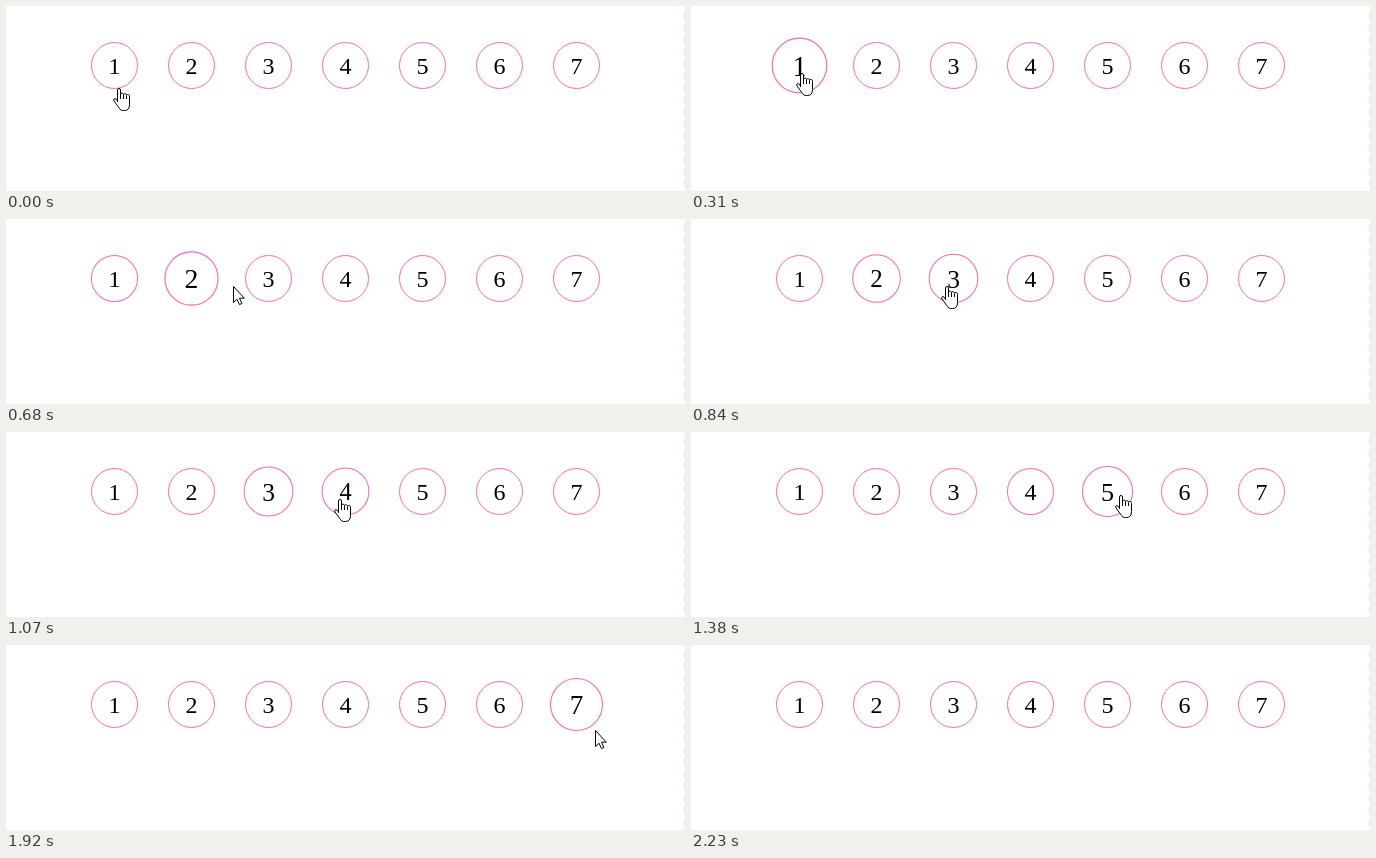
Animation, 679 px wide and 185 px high, one loop 2300 ms. Source, as an HTML page:

```html
<!DOCTYPE html>
<html lang="en">
<head>
<meta charset="utf-8">
<title>Hover circles</title>
<style>
  html, body { margin: 0; width: 100%; height: 100%; overflow: hidden; background: #fff; }
  svg { display: block; }
  .ring { fill: none; stroke: #ff69b4; }
  text { font: 24px "Liberation Serif", "Times New Roman", serif; text-anchor: middle; }
  .cursor { fill: #fff; stroke: #000; stroke-linejoin: round; }
</style>
</head>
<body>
<svg width="679" height="185" viewBox="0 0 679 185">
  <path d="M678.5 6V185" stroke="#ffdcec" stroke-dasharray="7 5"/>
  <g id="circles"></g>
  <g id="cursor" class="cursor">
    <path id="arrow" d="M.5 .5V16.5L4 13.2 6.5 18.6 8.9 17.5 6.5 12.2H11.3z"/>
    <path id="hand" d="M-1.5 14V2a1.5 1.5 0 0 1 3 0V6a1.6 1.6 0 0 1 3 .5a1.6 1.6 0 0 1 3 .8a1.6 1.6 0 0 1 3 1V16.5q0 6-5 6H3.5q-2 0-3-2L-5 13q-1-2.2 .8-2.5q1.3 0 2.7 2.5zM1.5 6V11M4.5 6.5V11M7.5 7.5V11"/>
  </g>
</svg>
<script>
const COUNT = 7, LOOP = 2300, STEPS = 30, STEP = LOOP / STEPS;
const GROW = 450, ZOOM = .2, REACH = 25;
const $ = id => document.getElementById(id);
const show = (id, on) => $(id).style.display = on ? "" : "none";

// Pointer path: step, x, y
const path = [
  [0, 113, 82], [4, 111, 67], [5, 185, 66], [8, 200, 66], [9, 227, 67],
  [12, 270, 67], [14, 334, 67], [18, 430, 63], [22, 545, 60], [25, 589, 85], [28, 608, 184]
];

const centerX = i => 108.5 + 77 * i, centerY = 59.5;
const inside = (i, [x, y]) => Math.hypot(x - centerX(i), y - centerY) < REACH;

function pointerAt(step) {
  const k = path.findIndex(p => p[0] > step);
  if (k < 0) return null;
  const [s0, x0, y0] = path[k - 1], [s1, x1, y1] = path[k];
  const f = (step - s0) / (s1 - s0);
  return [x0 + (x1 - x0) * f, y0 + (y1 - y0) * f];
}

// First and last moment, in ms, at which the pointer is over circle i
function hoverSpan(i) {
  const times = [];
  for (let t = 0; t < LOOP; t += 2) {
    const pos = pointerAt(t / STEP);
    if (pos && inside(i, pos)) times.push(t);
  }
  return [times[0], times.at(-1)];
}

// The CSS "ease" curve
function ease(x) {
  if (x <= 0) return 0;
  if (x >= 1) return 1;
  const bez = (a, b, u) => 3 * a * u * (1 - u) ** 2 + 3 * b * u * u * (1 - u) + u ** 3;
  let lo = 0, hi = 1;
  for (let n = 0; n < 20; n++) {
    const mid = (lo + hi) / 2;
    if (bez(.25, .25, mid) < x) lo = mid; else hi = mid;
  }
  return bez(.1, 1, lo);
}

// Leaving early shortens the way back, as in a reversed CSS transition
function scaleAt(t, [start, end]) {
  if (t < end) return 1 + ZOOM * ease((t - start) / GROW);
  const peak = ease((end - start) / GROW);
  return 1 + ZOOM * peak * (1 - ease((t - end) / (GROW * peak)));
}

const spans = Array.from({ length: COUNT }, (_, i) => hoverSpan(i));
$("circles").innerHTML = spans.map((_, i) =>
  `<g><circle class="ring" r="23"/><text y="8.5">${i + 1}</text></g>`).join("");
const circles = [...$("circles").children];

function draw(now) {
  const step = Math.min(STEPS - 1, Math.floor((now % LOOP + 10) / STEP));
  circles.forEach((c, i) => c.setAttribute("transform",
    `translate(${centerX(i)} ${centerY}) scale(${scaleAt(step * STEP, spans[i])})`));

  const pos = pointerAt(step);
  show("cursor", pos);
  if (!pos) return;
  const over = spans.some((_, i) => inside(i, pos));
  $("cursor").setAttribute("transform", `translate(${pos.map(Math.round)})`);
  show("hand", over);
  show("arrow", !over);
}

let first;
function tick(now) {
  first ??= now;
  draw(now - first);
  requestAnimationFrame(tick);
}
draw(0);
requestAnimationFrame(tick);
</script>
</body>
</html>
```
